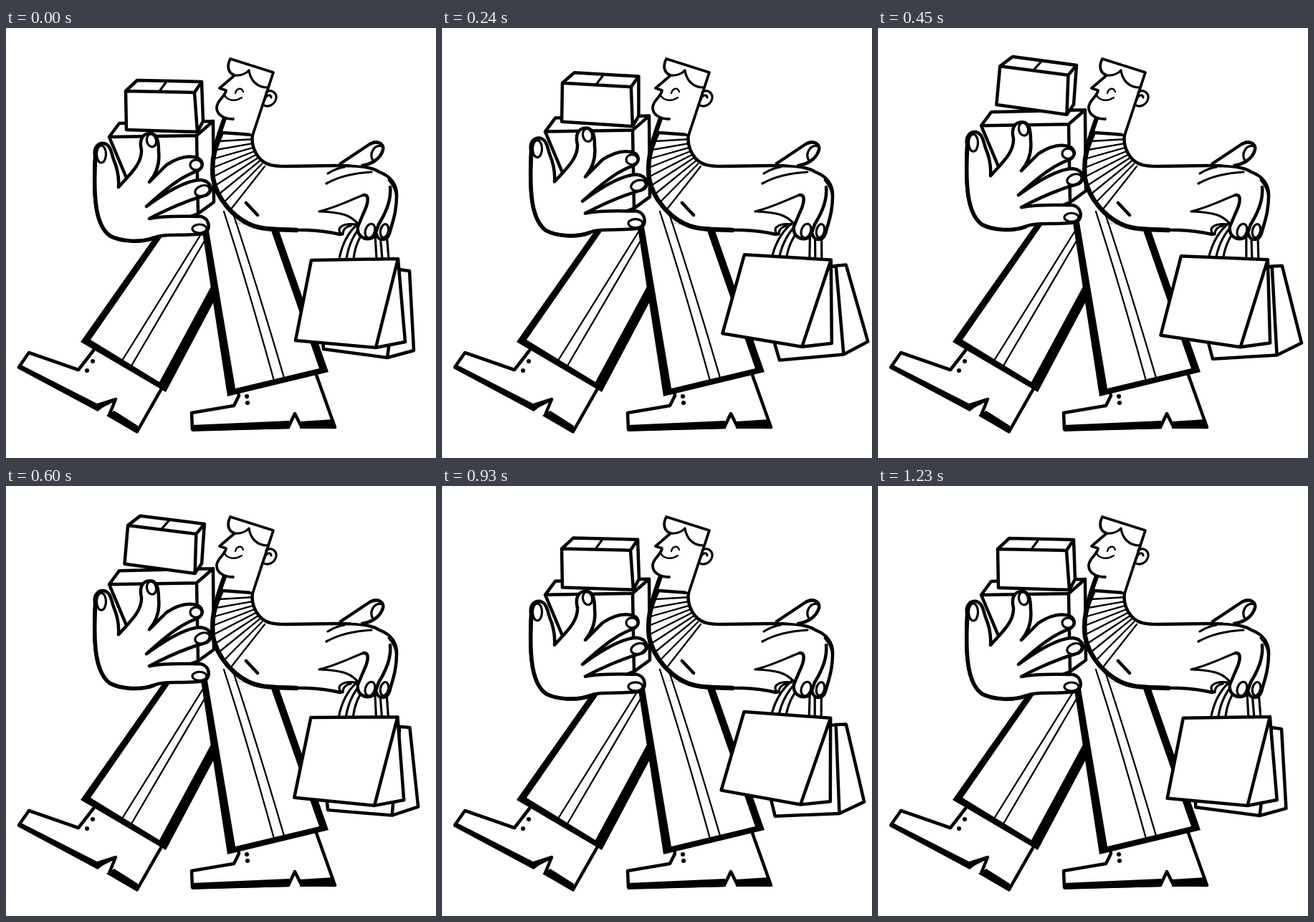
An HTML page for the animation above (1260 ms loop, 600 px wide and 600 px high).

```html
<!DOCTYPE html>
<html lang="en">
<head>
<meta charset="utf-8">
<title>Shopper</title>
<style>
  html, body { margin: 0; width: 100%; height: 100%; overflow: hidden; background: #fff; }
  svg { display: block; width: 100%; height: 100%; }
  path, ellipse { fill: #fff; stroke: #000; stroke-width: 4.5; stroke-linejoin: round; stroke-linecap: round; }
  ellipse { stroke-width: 3.2; }
  .ink { fill: #000; stroke: none; }
  .paper { stroke: none; }
  .line, .mid, .thin, .heavy { fill: none; }
  .mid { stroke-width: 3.2; }
  .thin { stroke-width: 2.3; }
  .heavy { stroke-width: 6.5; }
  .dots { fill: none; stroke-width: 6; }
</style>
</head>
<body>
<svg viewBox="0 0 600 600">
  <g id="shoes">
    <path d="M122 450L101 477L32 453L18 473L127 531L153 518L144 540L183 563L216 505"/>
    <path class="ink" d="M19 469L127 524L152 516L128 535L16 475ZM151 534L184 555L183 566L140 541Z"/>
    <path d="M322 500L325 513L318 527L259 537L260 560L394 557L403 538L412 556L459 557L433 484"/>
    <path class="ink" d="M259 554L395 548L396 559L259 563ZM410 549L457 546L461 559L410 559Z"/>
    <path class="dots" d="M121 465h.1M113 478h.1M336 514h.1M337 523h.1"/>
  </g>
  <g id="legs">
    <path class="ink" d="M228 262L104 438L223 508L292 378L284 300Z"/>
    <path class="paper" d="M238 262L118 435L214 494L288 357L276 262Z"/>
    <path class="thin" d="M280 275L162 464M284 285L174 473"/>
    <path class="ink" d="M271 265L309 514L450 480L380 280Z"/>
    <path class="paper" d="M280 265L320 503L437 475L369 280Z"/>
    <path class="thin" d="M304 256Q336 355 374 492M318 262Q352 365 388 488"/>
  </g>
  <g id="crate">
    <path d="M144 152L158 133L289 130L290 243L268 259L200 285ZM144 152L266 150L289 130M266 150L268 259"/>
  </g>
  <g id="parcel">
    <path d="M167 88L183 73L273 75L275 130L267 145L168 142ZM167 88L263 90L273 75M263 90L267 145"/>
    <path class="mid" d="M215 87L223 76"/>
  </g>
  <g id="body">
    <path d="M545 235C546 219 537 207 521 201C508 192 482 192 460 192L390 193C375 193 362 192 353 181C346 172 342 162 344 149L302 146C291 170 286 190 289 210C294 238 318 266 345 276C362 282 400 282 420 282Q445 283 466 288"/>
    <path class="heavy" d="M305 126C291 165 286 185 289 210C294 238 318 266 345 276C362 282 385 281 405 282"/>
    <path style="stroke-width:3.8" d="M344 150L373 62L313 43C307 55 311 63 319 66L298 84L307 87C306 96 294 101 294 111C294 121 304 127 317 127"/>
    <path class="mid" d="M319 66C328 67 336 63 339 59C341 73 350 83 365 83"/>
    <path class="thin" d="M304 92C308 102 320 103 329 97M320 91C322 83 329 83 331 89"/>
    <path class="mid" d="M363 90C370 84 378 91 377 98C375 107 366 112 358 107M361 100C363 93 370 92 370 97"/>
    <path class="thin" id="ribs"/>
    <path class="line" d="M335 244L351 261"/>
    <path class="mid" d="M447 217Q472 203 510 201M449 203Q460 196 472 194"/>
    <path d="M467 189L506 163C516 156 528 160 526 170C523 181 512 190 497 192"/>
    <path class="mid" d="M525 165C514 162 506 175 512 185"/>
    <path class="mid" d="M490 272C480 261 468 257 437 256C462 250 480 240 499 233"/>
    <path class="mid" d="M468 288C460 280 468 272 488 274M470 288C470 281 475 277 481 276"/>
  </g>
  <g id="rear">
    <path d="M436 335L549 337L563 339L569 450L532 460L443 448ZM549 337L532 460"/>
  </g>
  <g id="front">
    <path class="mid" d="M465 322C469 301 478 285 490 274M475 322C478 303 485 288 496 276M485 322C487 305 492 292 502 281M517 322L515 288M525 322L522 288M534 322L531 286"/>
    <path d="M426 324L547 322L557 438L516 446L404 436ZM547 322L516 446"/>
  </g>
  <g id="grip">
    <path d="M517 288C519 297 531 298 535 287C539 272 545 257 545 235C545 226 541 219 535 212"/>
    <ellipse cx="528" cy="283" rx="5.5" ry="9.5" transform="rotate(12 528 283)"/>
    <path d="M499 233C508 232 505 246 499 258L491 277C489 290 500 297 511 293C517 289 517 281 520 274C530 258 538 240 536 222"/>
    <ellipse cx="508" cy="283" rx="6.5" ry="10" transform="rotate(18 508 283)"/>
  </g>
  <g id="hand">
    <path d="M124 178C122 165 130 160 137 161C146 163 147 174 150 183C156 197 158 208 157 222C172 205 190 190 189 170C185 154 192 147 201 147C211 147 213 158 213 172C215 190 210 203 200 215L224 191C238 182 250 178 262 180C276 182 277 194 268 199C245 207 226 222 196 249C230 224 255 212 272 212C287 214 290 228 280 233C255 240 230 250 200 266C225 261 250 263 272 263C285 266 286 283 276 287C240 291 222 286 205 293C188 300 160 298 145 290C125 276 121 240 124 178"/>
    <path class="line" style="stroke-width:5.5" d="M125 178C121 240 126 276 145 290C160 298 188 300 206 293"/>
    <ellipse cx="133" cy="176" rx="6.5" ry="12"/>
    <ellipse cx="203" cy="157" rx="6.5" ry="9" transform="rotate(-12 203 157)"/>
    <ellipse cx="265" cy="191" rx="8" ry="7"/>
    <ellipse cx="274" cy="227" rx="10.5" ry="7" transform="rotate(-20 274 227)"/>
    <ellipse cx="270" cy="280" rx="10" ry="6"/>
  </g>
</svg>
<script>
const LOOP = 1260, STEP = 30, RIBS = 10;
const el = id => document.getElementById(id);
const ease = p => (1 - Math.cos(Math.PI * p)) / 2;
const quad = (a, b, c, p) => a.map((v, i) =>
  (1 - p) ** 2 * v + 2 * p * (1 - p) * b[i] + p * p * c[i]);

// Sweater ribs fan out between the back of the neck and the chest.
el("ribs").setAttribute("d", Array.from({ length: RIBS }, (_, i) => {
  const p = i / (RIBS - 1);
  return `M${quad([302, 146], [275, 200], [313, 254], p)}L${quad([343, 149], [343, 178], [361, 193], p)}`;
}).join(""));

// Rises from one level to a peak, then settles on another.
function hop(t, peak, end, from = 0, to = 0, top = 1) {
  if (t >= end) return to;
  return t < peak
    ? from + (top - from) * ease(t / peak)
    : top + (to - top) * ease((t - peak) / (end - peak));
}

function place(id, x, y, turn = 0, px = 0, py = 0) {
  el(id).setAttribute("transform", `translate(${x} ${y}) rotate(${turn} ${px} ${py})`);
}

function draw(t) {
  const half = LOOP / 2, u = t % half, second = t >= half;

  const lift = hop(t, 510, 960);
  const toss = t < 510 ? lift ** 1.5 : lift;
  place("crate", 0, -16.3 * lift);
  place("hand", 0, -16.3 * lift);
  place("parcel", 0, -31 * toss, 6.6 * toss, 217, 115);

  const swing = second ? hop(u, 315, half, .1) : hop(u, 315, half, 0, .1);
  const sway = second ? hop(u, 300, half, .17, 0, .65) : hop(u, 330, half, 0, .17);
  place("front", 0, 0, 5.1 * swing, 525, 268);
  place("rear", 0, 3 * sway, -15.5 * sway, 515, 330);
}

const start = performance.now();
function tick() {
  const t = (performance.now() - start) % LOOP;
  draw(Math.floor(t / STEP) * STEP);
  requestAnimationFrame(tick);
}
tick();
</script>
</body>
</html>
```
